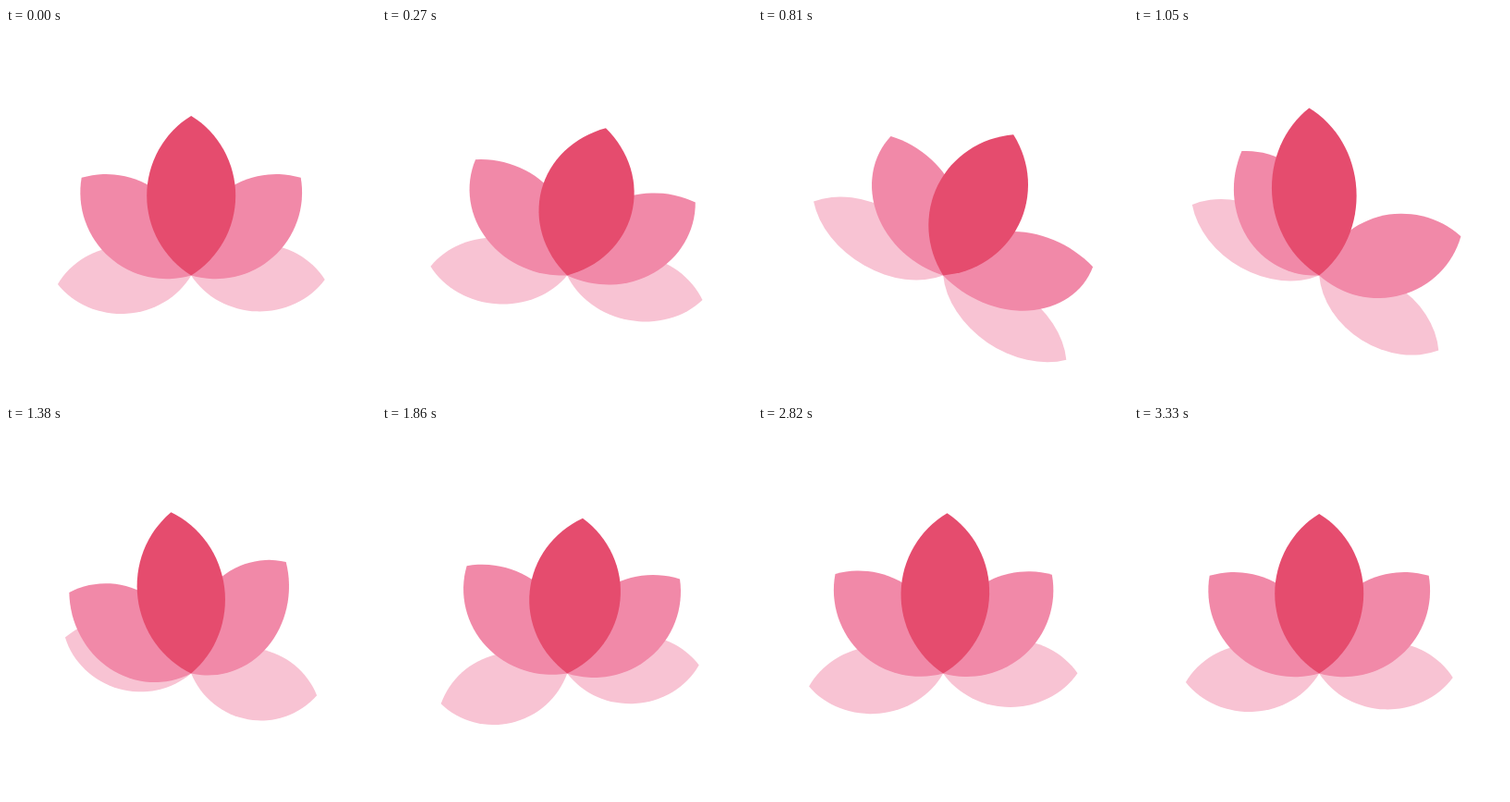
Recreate the animation shown at these times as an HTML page. Size 400 by 400 pixels, loop 5360 ms.

```html
<!DOCTYPE html>
<html lang="en">
<head>
<meta charset="utf-8">
<title>Lotus</title>
<style>
html, body { margin: 0; width: 100%; height: 100%; overflow: hidden; background: #fff; }
svg { display: block; width: 100%; height: 100%; }
</style>
</head>
<body>
<svg id="stage" viewBox="0 0 400 400"></svg>
<script>
const LOOP = 5360, STEP = 30, END = 3330;
const BASE = [200.2, 267.4];
const SWING = 33, SWAY = 12, SQUASH = 0.105, PERIOD = 1.05;
const LENS = 'M0 0A101.5 101.5 0 0 1 0 -172.5A101.5 101.5 0 0 1 0 0Z';

// Back to front; a higher order reacts later.
const petals = [
  { color: '#f8c3d3', rest: -93.8, width: 0.765, height: 0.838, order: 4 },
  { color: '#f8c3d3', rest: 91.8, width: 0.765, height: 0.838, order: 3 },
  { color: '#f189a8', rest: -48.3, width: 0.92, height: 0.92, order: 1 },
  { color: '#f189a8', rest: 48.3, width: 0.92, height: 0.92, order: 2 },
  { color: '#e54c6e', rest: 0, width: 1, height: 1, order: 0 }
];

const stage = document.getElementById('stage');
for (const p of petals) {
  p.node = document.createElementNS('http://www.w3.org/2000/svg', 'path');
  p.node.setAttribute('d', LENS);
  p.node.setAttribute('fill', p.color);
  stage.append(p.node);
}

// Lean to the right, swing back, then sway until still.
function pose(t, order) {
  const peak = 580 + 70 * order, release = 1000 + 150 * order;
  if (t < peak) {
    const rise = (1 - Math.cos(Math.PI * t / peak)) / 2;
    return { turn: SWING * rise, squash: SQUASH * rise };
  }
  if (t < release) {
    const v = (t - peak) / (release - peak);
    return {
      turn: SWING * Math.cos(Math.PI / 2 * v ** 1.5),
      squash: SQUASH * (0.25 + 0.75 * Math.cos(Math.PI * v))
    };
  }
  const s = (t - release) / 1000;
  const fade = ((END - t) / (END - release)) ** 1.4;
  return {
    turn: -SWAY * fade * Math.sin(2 * Math.PI * s / PERIOD),
    squash: -SQUASH / 2 * fade * Math.cos(3 * s)
  };
}

function draw(time) {
  const t = Math.min(END, Math.floor(time / STEP) * STEP);
  for (const p of petals) {
    const { turn, squash } = pose(t, p.order);
    const tall = 1 - squash;
    p.node.setAttribute('transform',
      `translate(${BASE}) rotate(${turn}) scale(${1 / tall} ${tall}) ` +
      `rotate(${p.rest}) scale(${p.width} ${p.height})`);
  }
}

const start = performance.now();
function tick() {
  draw((performance.now() - start) % LOOP);
  requestAnimationFrame(tick);
}
draw(0);
requestAnimationFrame(tick);
</script>
</body>
</html>
```
